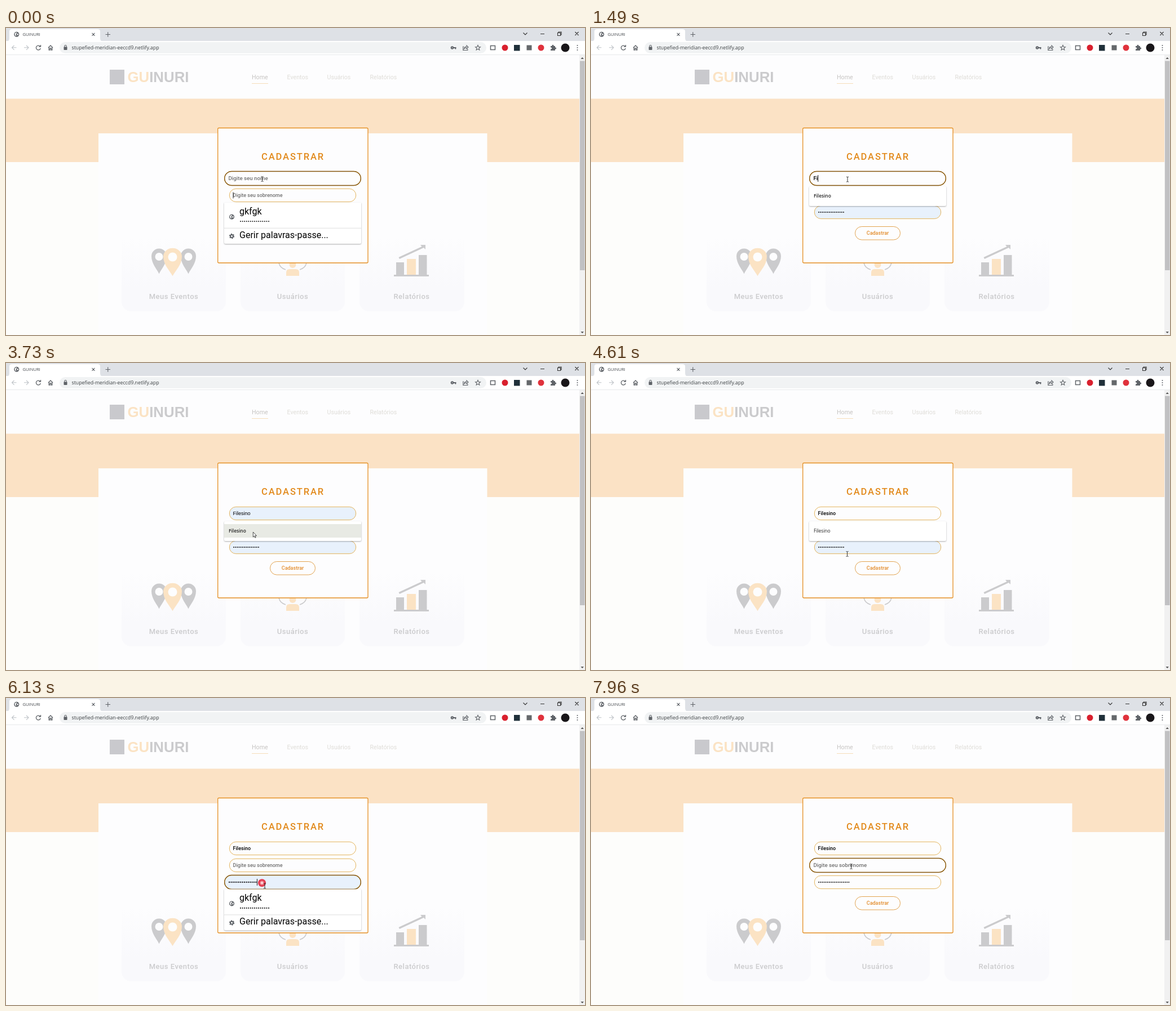
Animation, 1027 px wide and 545 px high, one loop 8 s. Source, as an HTML page:

```html
<!DOCTYPE html>
<html lang="pt">
<head>
<meta charset="utf-8">
<title>GUINURI</title>
<style>
  html, body { margin: 0; width: 100%; height: 100%; overflow: hidden; background: #fff; }
  svg { display: block; width: 1027px; height: 545px; }
  text { font-family: Roboto, sans-serif; }
  .ui text, text.ui { font-family: "Open Sans", "Noto Sans", sans-serif; }
  .line { fill: none; stroke: #5f6368; stroke-width: 1.1; }
  .nav { font-size: 10.67px; fill: #dfddd8; }
  .label { font-size: 13px; font-weight: 500; letter-spacing: .5px; fill: #cbcbcd; text-anchor: middle; }
  .field text { font-size: 9px; font-weight: 500; }
  .hint { fill: #707070; }
  .dots { fill: none; stroke: #1b1b1b; stroke-linecap: round; stroke-width: 2.1; stroke-dasharray: 0 3.13; }
  .popup { filter: drop-shadow(0 1px 1.2px rgba(0, 0, 0, .32)); }
  .popup text { font-size: 8px; fill: #222; }
</style>
</head>
<body>
<svg viewBox="0 0 1027 545">
  <defs>
    <linearGradient id="tile" x2="0" y2="1">
      <stop offset=".2" stop-color="#fdfdfe"/><stop offset=".75" stop-color="#f9f9fc"/>
    </linearGradient>
    <radialGradient id="glow">
      <stop stop-color="#fff"/><stop offset=".3" stop-color="#f7a9b2"/>
      <stop offset=".65" stop-color="#e23c50"/><stop offset="1" stop-color="#e64457"/>
    </radialGradient>
    <path id="pin" d="M0 23C-4 14-13.500 5-13.500-8.500A13.500 13.500 0 0 1 13.500-8.500C13.500 5 4 14 0 23Z"/>
    <g id="globe">
      <circle r="4.500" fill="#5f6368"/>
      <path d="M-3.200-1.500Q-1-4 .5-3Q0-1-1.500-.5L-.5 1.500L-1.500 3.200Q-3.500 1.500-3.200-1.500ZM2-2L3.300 0L2 2L.6.4Z" fill="#fff"/>
    </g>
    <g id="saved">
      <path d="M387 0H630V70.500Q630 73 627.500 73H389.500Q387 73 387 70.500Z" fill="#fff"/>
      <use href="#globe" x="400.500" y="25.300"/>
      <text x="414" y="20.800">gkfgk</text>
      <path class="dots" d="M416 33.300H467" style="stroke-dasharray:0 3.570"/>
      <path d="M387 45.300H630" stroke="#dedede"/>
      <circle cx="400.500" cy="59.500" r="2.500" fill="none" stroke="#5f6368" stroke-width="2"/>
      <circle cx="400.500" cy="59.500" r="3.900" fill="none" stroke="#5f6368" stroke-width="1.600" stroke-dasharray="2 2.080"/>
      <text x="414" y="62.500">Gerir palavras-passe...</text>
    </g>
  </defs>

  <!-- browser window -->
  <g class="ui">
    <rect width="1027" height="24" fill="#dee1e6"/>
    <path d="M0 24Q6 24 6 18V6Q6 2 11 2H162Q167 2 167 6V18Q167 24 173 24Z" fill="#fff"/>
    <rect y="23" width="1027" height="25" fill="#fff"/>
    <use href="#globe" x="18.800" y="11.300"/>
    <text x="29.500" y="14" font-size="7.600" fill="#45494d">GUINURI</text>
    <path class="line" stroke="#3c4043" d="M152.500 8.800l5 5m0-5l-5 5M176.500 11.500h8.500m-4.250-4.250v8.500"/>
    <path class="line" style="stroke:#333" d="M917.500 8.500l3.500 3.500l3.500-3.500M948 10.500h7M1009.500 7l6 6m0-6l-6 6M978.500 8.500h5v5h-5zM980 8.500v-1.500h5v5h-1.500"/>
    <path class="line" style="stroke:#bdc1c6" d="M18.500 34.800h-8m4-4l-4 4l4 4M32 34.800h8m-4-4l4 4l-4 4"/>
    <path class="line" style="stroke-width:1.300" d="M60.500 32.500A4 4 0 1 0 61.300 36M61.500 30v3.200h-3.200M75 35l4-4l4 4M76.200 34.500v4.500h1.800v-3h2v3h1.800v-4.500"/>
    <rect x="95" y="25" width="757" height="20" rx="10" fill="#f1f3f4"/>
    <rect x="102.500" y="33.500" width="6" height="5.500" rx=".7" fill="#5f6368"/>
    <path class="line" d="M103.800 34v-1.800a1.700 1.700 0 0 1 3.400 0V34"/>
    <text x="116.500" y="38.300" font-size="8.800" fill="#3c4043">stupefied-meridian-eeccd9.netlify.app</text>
    <circle class="line" cx="791.500" cy="35" r="1.800" style="stroke-width:2"/>
    <path class="line" style="stroke-width:2" d="M793.500 35h5m-1.200 0v2.500"/>
    <path class="line" d="M812 33h-1.200v6.500h8v-2.500M812.500 37q.5-4 4.500-4v-2l3 3l-3 3v-2q-3 0-4.500 2zM837 30.500l1.300 3l3.200.2l-2.500 2.100l.8 3.200l-2.800-1.700l-2.800 1.700l.8-3.200l-2.500-2.100l3.200-.2z"/>
    <rect class="line" x="859.500" y="31.500" width="8" height="7" style="stroke-width:1.500"/>
    <circle cx="885" cy="35" r="5.500" fill="#d9202e"/>
    <rect x="901" y="30" width="10.500" height="10.500" fill="#20303a"/>
    <rect x="923.500" y="30.500" width="9" height="9" fill="#65686b"/>
    <circle cx="949" cy="35" r="5.500" fill="#e0323c"/>
    <path d="M966 32h2.500a1.600 1.600 0 1 1 3 0h2.500v2.500a1.600 1.600 0 1 1 0 3v2.500h-8v-2.500a1.600 1.600 0 1 0 0-3z" fill="#5f6368"/>
    <circle cx="992" cy="35" r="7.500" fill="#191619"/>
    <path d="M1013.500 31v9" stroke="#5f6368" stroke-width="2" stroke-linecap="round" stroke-dasharray="0 4"/>
  </g>

  <!-- faded page -->
  <rect y="48" width="1017" height="497" fill="#fdfdfb"/>
  <rect y="48" width="1017" height="78" fill="#fdfdfe"/>
  <path d="M0 47.500H1027" stroke="#e8eaec"/>
  <rect y="125.500" width="1017" height="112.500" fill="#fbe2c5"/>
  <rect x="164" y="187" width="689.500" height="358" fill="#fdfdfe"/>
  <rect x="184" y="74" width="26" height="26" fill="#c9c9cd"/>
  <text x="215.500" y="95.500" font-size="25.800" font-weight="700" fill="#cbcbcd" style="font-family:'Liberation Sans',Arial,sans-serif"><tspan fill="#fbe3c4">GU</tspan>INURI</text>
  <text class="nav" x="436" y="90.500" style="fill:#c6c4c2">Home</text>
  <path d="M436 98.500H465" stroke="#f6ddb9"/>
  <text class="nav" x="498.500" y="90.500">Eventos</text>
  <text class="nav" x="569.500" y="90.500">Usuários</text>
  <text class="nav" x="645.500" y="90.500">Relatórios</text>
  <g fill="url(#tile)">
    <rect x="205" y="337" width="185" height="166" rx="17"/>
    <rect x="416" y="337" width="185" height="166" rx="17"/>
    <rect x="627" y="337" width="186" height="166" rx="17"/>
  </g>
  <text class="label" x="297.500" y="481">Meus Eventos</text>
  <text class="label" x="508.500" y="481">Usuários</text>
  <text class="label" x="719.500" y="481">Relatórios</text>
  <g fill="#cbcbcd">
    <use href="#pin" x="271.500" y="413.500"/><use href="#pin" x="323.500" y="413.500"/>
    <use href="#pin" transform="translate(295.500 415) scale(1.220 1.100)" fill="#fbe3c4"/>
    <g fill="#fdfdfe"><circle cx="271.500" cy="406" r="7"/><circle cx="323.500" cy="406" r="7"/><circle cx="295.500" cy="406.500" r="8"/></g>
    <path d="M692 416h14v22h-14zM732 403h14.500v35H732zM688 438h62v3h-62zM735 385h9v8l-3-3l-43 20l-1.500-3l41-19z"/>
    <path d="M711 410h16v28h-16z" fill="#fbe3c4"/>
  </g>
  <path d="M484 417Q486 426 496 429M533 417Q531 426 521 429" fill="none" stroke="#cbcbcd" stroke-width="1.600"/>
  <circle cx="508.500" cy="420" r="6" fill="#fbe3c4"/>
  <path d="M497 440V434Q497 428 503 428H514Q520 428 520 434V440Z" fill="#fbe3c4"/>

  <rect x="1017" y="48" width="10" height="497" fill="#f1f1f1"/>
  <rect x="1018" y="58.500" width="8.500" height="371.500" fill="#c1c1c3"/>
  <path d="M1019.500 55l2.700-3l2.700 3zM1019.500 539l2.700 3l2.700-3z" fill="#555"/>

  <!-- dialog -->
  <rect x="375.700" y="177.500" width="266.300" height="239.500" rx="2" fill="#fdfdfe" stroke="#e58f22" stroke-width="1.300"/>
  <text x="453" y="234" font-size="16.500" font-weight="500" letter-spacing="1.900" fill="#e28a1c">CADASTRAR</text>
  <g id="fields"></g>
  <rect x="468.500" y="352.500" width="80" height="23.500" rx="11.750" fill="#fdfdfe" stroke="#e2a350"/>
  <text x="508.500" y="367.300" font-size="9" font-weight="500" fill="#e28a28" text-anchor="middle">Cadastrar</text>

  <g id="names" class="popup ui"></g>
  <g id="logins" class="popup ui"><use href="#saved"/></g>
  <circle id="ring" fill="url(#glow)"/>
  <g id="pointer">
    <path id="beam" d="M-2-4.500Q0-4.500 0-3.500Q0-4.500 2-4.500M0-3.500V3.500M-2 4.500Q0 4.500 0 3.500Q0 4.500 2 4.500" fill="none" stroke="#222" stroke-width=".9"/>
    <path id="arrow" d="M0 0V9L2 7.200L3.500 10.300L4.800 9.700L3.400 6.700H6.200Z" fill="#fff" stroke="#222" stroke-width=".8"/>
  </g>
</svg>
<script>
const LOOP = 8000, NAME = 'Filesino';
const get = id => document.getElementById(id);
const show = (el, on) => el.style.display = on ? '' : 'none';
const set = (el, attrs) => { for (const k in attrs) el.setAttribute(k, attrs[k]); };
const ramp = (t, a, b) => Math.min(1, Math.max(0, (t - a) / (b - a)));
const within = (t, a, b) => t >= a && t < b;
const ease = p => p * p * (3 - 2 * p);
const passed = (times, t) => times.filter(x => t >= x).length;

// Times of each letter, each extra password dot, and everything that restarts the caret.
const nameKeys = [1300, 1490, 1750, 2130, 2250, 2480, 2480, 2930];
const dotKeys = [6700, 6770, 6970];
const clicks = [730, 6020];
const caretResets = [0, clicks[0] + 70, ...nameKeys, clicks[1], ...dotKeys];
const path = [[0, 454.5, 268], [200, 455, 268.7], [3470, 455, 268.7], [3730, 438.3, 300], [4190, 438.3, 300],
  [4400, 450, 346], [4610, 454.5, 339], [4800, 459, 333.5], [7500, 459, 333.5], [7960, 461.5, 299]];

const LEFT = -105.9, DOT = 3.13;
const fields = [267, 297, 327].map((cy, i) => {
  const g = document.createElementNS('http://www.w3.org/2000/svg', 'g');
  const box = 'x="-112.2" y="-11.6" width="224.4" height="23.2" rx="11.6"';
  g.setAttribute('class', 'field');
  g.innerHTML = `<rect ${box} fill="#fdfdfe" stroke="#e3b055" stroke-width=".95"/>
    <rect ${box} fill="none" stroke="#85560c" stroke-width="1.25"/>
    ${i < 2 ? `<text x="${LEFT}" y="3.2"></text>` : `<path class="dots"/>`}
    <path stroke="#111" stroke-width=".9"/>`;
  get('fields').append(g);
  const [fill, edge, value, caret] = g.children;
  return { g, cy, fill, edge, value, caret };
});

const others = ['Amadino', 'Beltreno', 'Carlinda', 'Dorivela', 'Elmarino'];
get('names').innerHTML = '<rect x="387" y="281" width="243" rx="2" fill="#fff"/>' +
  '<rect x="387" y="286" width="243" height="24" fill="#e8eae4"/>' +
  [NAME, ...others].map((n, i) => `<text x="395" y="${301 + 24 * i}" style="font-size:8.4px">${n}</text>`).join('');
const [listBox, listRow, ...listTexts] = get('names').children;

function mouseAt(t) {
  const i = Math.max(1, path.findIndex(p => p[0] > t));
  if (t >= path.at(-1)[0]) return path.at(-1).slice(1);
  const [a, b] = [path[i - 1], path[i]], p = ease(ramp(t, a[0], b[0]));
  return [a[1] + (b[1] - a[1]) * p, a[2] + (b[2] - a[2]) * p];
}

function drawFields(t, preview) {
  const hover = [1 - ramp(t, 3490, 3640), ramp(t, 7640, 7840), ramp(t, 4630, 4780) - ramp(t, 7520, 7700)];
  const focus = t < clicks[0] ? 1 : t < clicks[1] ? 0 : 2;
  const lastReset = caretResets.filter(x => t >= x).at(-1);
  const caretOn = Math.floor((t - lastReset) / 525) % 2 === 0 && !preview;
  const typed = NAME.slice(0, passed(nameKeys, t)), dots = 15 + passed(dotKeys, t);

  fields.forEach((f, i) => {
    const blue = i === 0 ? preview : i === 2 && t < dotKeys[0];
    set(f.g, { transform: `translate(508.5 ${f.cy}) scale(${1 + .077 * ease(hover[i])})` });
    set(f.fill, { fill: blue ? '#e8f1fc' : '#fdfdfe' });
    set(f.edge, { opacity: hover[i] });
    let end = LEFT;
    if (i === 2) {
      set(f.value, { d: `M${LEFT + 1.5} 0h${(dots - 1) * DOT + .1}` });
      end += dots * DOT;
    } else {
      const text = i === 0 ? typed : '';
      const hint = i === 0 ? 'Digite seu nome' : 'Digite seu sobrenome';
      if (f.value.textContent !== (text || hint)) f.value.textContent = text || hint;
      f.value.setAttribute('class', text ? '' : 'hint');
      f.value.style.cssText = i === 0 && preview ? "font:9px 'Liberation Sans',Arial,sans-serif" : '';
      if (text) end += f.value.getComputedTextLength();
    }
    set(f.caret, { d: `M${end + .4} -5.5v11` });
    show(f.caret, i === focus && caretOn);
  });
}

function drawPopups(t, preview) {
  const rows = t < 1320 ? 6 : 1;
  show(get('names'), within(t, 880, clicks[1]));
  set(listBox, { height: 11 + 24 * rows });
  show(listRow, preview);
  listTexts.forEach((el, i) => {
    show(el, i < rows);
    el.style.fontWeight = within(t, 1320, 4270) ? 600 : 400;
  });

  const first = t < 3000;
  const close = first ? ramp(t, 740, 870) : ramp(t, 6720, 6840);
  const open = first ? 1 : ramp(t, clicks[1], 6110);
  const y = first ? 310 : 339.6, s = 1 - .034 * close;
  set(get('logins'), {
    transform: `translate(508.5 ${y + 36.5}) scale(${s}) translate(-508.5 -36.5)`,
    opacity: open * (1 - close)
  });
}

function drawPointer(t) {
  const [x, y] = mouseAt(t), arrow = within(t, 3540, 4580);
  set(get('pointer'), { transform: `translate(${x} ${y})` });
  show(get('arrow'), arrow);
  show(get('beam'), !arrow);
  const start = clicks.find(c => within(t, c, c + 300));
  show(get('ring'), start !== undefined);
  if (start !== undefined) {
    const p = ramp(t, start, start + 300);
    set(get('ring'), { cx: x - 5, cy: y - 5.3, r: 4 + 11 * p * p ** .3, opacity: Math.min(1, 1.8 * (1 - p)) });
  }
}

function frame() {
  const t = performance.now() % LOOP;
  const preview = within(t, 3570, 4280);
  drawFields(t, preview);
  drawPopups(t, preview);
  drawPointer(t);
  requestAnimationFrame(frame);
}
frame();
</script>
</body>
</html>
```
